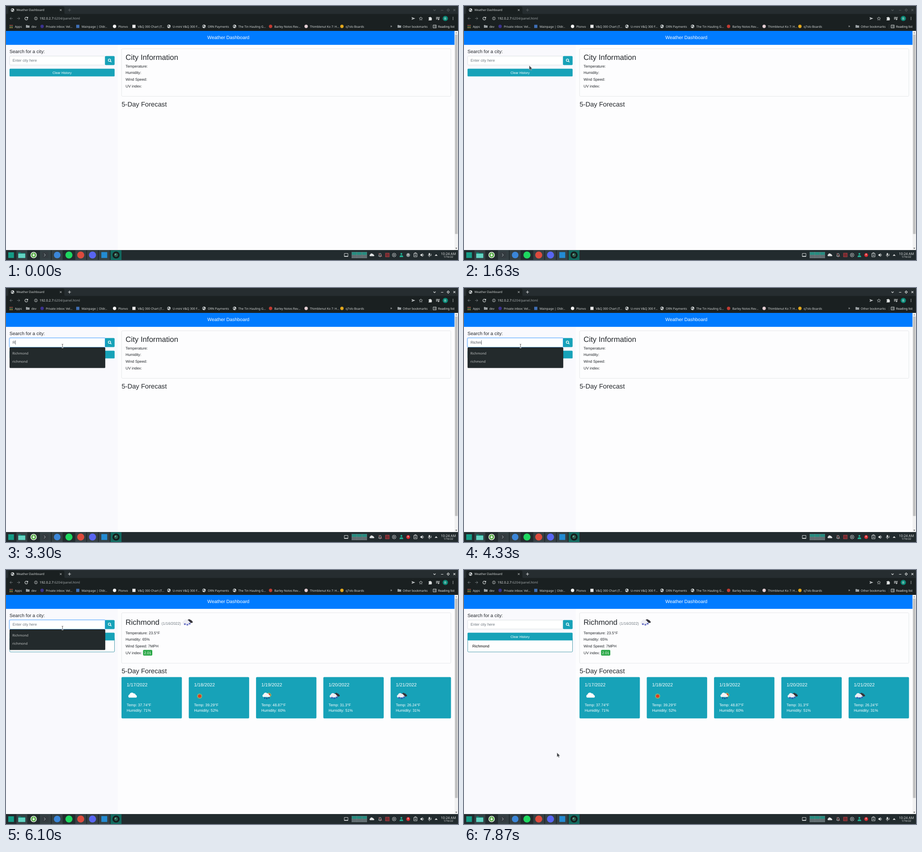
Write an HTML page that moves like this. It is 998 px wide and 561 px high and loops after 8000 ms.

```html
<!DOCTYPE html>
<html lang="en">
<head>
<meta charset="utf-8">
<title>Weather Dashboard</title>
<style>
html, body { margin: 0; width: 100%; height: 100%; overflow: hidden; background: #fdfdfe; }
svg { display: block; width: 100vw; height: 100vh; }
text { font: 8.317px "Liberation Sans", Arial, sans-serif; fill: #212529; text-rendering: geometricPrecision; white-space: pre; }
.ui text { font-family: "Noto Sans", "Open Sans", sans-serif; font-size: 6.65px; fill: #d9dcdc; }
</style>
</head>
<body>
<svg id="stage" viewBox="0 0 998 561" preserveAspectRatio="none"></svg>
<script>
const LOOP = 8000;
const TEAL = '#17a2b8', LIGHT = '#dfe2e2';

// Markup helpers
const rect = (x, y, w, h, fill, more = '') => `<rect x="${x}" y="${y}" width="${w}" height="${h}" fill="${fill}" ${more}/>`;
const dot = (x, y, r, fill, more = '') => `<circle cx="${x}" cy="${y}" r="${r}" fill="${fill}" ${more}/>`;
const fill = (d, color, more = '') => `<path d="${d}" fill="${color}" ${more}/>`;
const line = (d, color = LIGHT, w = 1, more = '') => `<path d="${d}" fill="none" stroke="${color}" stroke-width="${w}" ${more}/>`;
const text = (x, y, s, style = '', more = '') =>
  `<text x="${x}" y="${y}" style="${style}" ${more}>${s.replace(/&/g, '&amp;')}</text>`;
const at = (x, y, body) => `<g transform="translate(${x} ${y})">${body}</g>`;
const group = (id, body) => `<g id="${id}">${body}</g>`;

const globe = (x, y) => at(x, y, dot(0, 0, 3.7, LIGHT) +
  fill('M-3-1L-1-2.6L1-1.6L0 0L-1.6.4L-1 2L-2.6 1ZM1 .4L3 0L2 2.4L.6 2Z', '#30383b'));
const folder = (x, y) => fill(`M${x - 4} ${y - 3}h3l1 1h4v5h-8z`, '#9aa0a3');

// Weather icons
const cloud = (x, y, s, color) => at(x, y,
  fill('M-7 4A3.4 3.4 0 0 1-6-2A4.6 4.6 0 0 1 2-4A3.8 3.8 0 0 1 6-1A2.7 2.7 0 0 1 7 4Z', color, `transform="scale(${s})"`));
const flake = (x, y) => line(`M${x - 2.4} ${y}h4.8M${x - 1.2} ${y - 2}l2.4 4M${x + 1.2} ${y - 2}l-2.4 4`, '#3540b0', 0.9);
const sun = (x, y, r) => dot(x, y, r + 1.1, 'none', 'stroke="#f5b62c" stroke-width="1.8" stroke-dasharray="1.4 1"') + dot(x, y, r, '#e6391f');
const drop = (x, y) => fill(`M${x} ${y - 2}q2 2.6 0 4q-2.6-.6 0-4`, '#1b2a86');
const icons = {
  cloud: cloud(0, -1, 1.15, '#d6dde2') + cloud(0, -1.6, 1.08, '#fff'),
  sun: sun(0, 0, 3.6),
  rain: sun(4, -2.5, 3) + cloud(-2, -2, 1, '#f4f4f6') + drop(-5, 4) + drop(-.5, 5) + drop(4, 3.6),
  snow: cloud(5, -2.5, .82, '#35343b') + cloud(-2, -1, 1.02, '#eeeef4') + flake(-5.5, 3.6) + flake(0, 4.8) + flake(5, 2.6)
};

function browser() {
  const bookmarks = [
    [88, 'Private inbox: Vel...', '#3b3290'], [167, 'Mainpage | Oldr...', '#3f6fb5', 1], [248, 'Plonvo', '#f4f4f4'],
    [291, 'V&Q 300 Chart (T...', '#e8e8e8', 1], [368, 'U-mini V&Q 300 F...'], [445.5, 'ORN Payments'],
    [513, 'The Tin Hauling G...'], [592.5, 'Barley Notes Rev...', '#c23b32'],
    [671, 'Thimblenut Ko 7: H...', '#e3cdd2'], [750, 'q7vlo Boards', '#e2a71c']
  ];
  let s = rect(0, 0, 998, 18, '#262d30') + rect(0, 17.5, 998, 37.5, '#1a2021') +
    fill('M2 18q3 0 3-3V5q0-4 4-4h116q4 0 4 4v10q0 3 3 3z', '#1a2021') +
    globe(14.5, 9) + text(23, 11.4, 'Weather Dashboard', 'font-size:6.55px') +
    line('M118.8 7l4 4m0-4l-4 4', '#c9cccc', .9) +
    group('controls', line('M137 9h6.4m-3.2-3.2v6.4M943.8 8l2.4 2.4l2.4-2.4M960.5 9.5h5M973.8 9l2.6-2.6l2.6 2.6l-2.6 2.6zM987.8 6.8l4.4 4.4m0-4.4l-4.4 4.4', LIGHT, 1.1));
  // Toolbar
  s += line('M14.6 27.5h-6m3-3l-3 3l3 3M24.6 27.5h6m-3-3l3 3l-3 3', '#70777a', 1) +
    line('M47.4 25.6a3.2 3.2 0 1 0 .6 3', LIGHT, 1.1) + fill('M48.6 23.6v3.6h-3.6z', LIGHT) +
    dot(66, 27.5, 3.2, 'none', `stroke="${LIGHT}" stroke-width=".8"`) + line('M66 27v2.2M66 25.4v.9', LIGHT, .9) +
    text(74, 30.2, '192.0.2.7<tspan fill="#9ba1a3">:6204/panel.html</tspan>', 'font-size:7.3px') +
    fill('M895.5 24.5l8 3l-8 3l.8-2.5l3.5-.5l-3.5-.5z', '#c5c9ca') +
    line('M916 24l1.1 2.4l2.6.3l-1.9 1.8l.5 2.6l-2.3-1.3l-2.3 1.3l.5-2.6l-1.9-1.8l2.6-.3z', '#c5c9ca', .8) +
    fill('M933 25.3h2.2a1.3 1.3 0 0 1 2.6 0h2v2.2a1.3 1.3 0 0 1 0 2.4v1.8h-6.8v-2a1.2 1.2 0 0 0 0-2.4z', LIGHT) +
    line('M949.5 25h5.6m-5.6 2h5.6m-5.6 2h3.2M956 30v-5h1.8', LIGHT, 1) + dot(955, 29.8, 1.3, LIGHT) +
    dot(970, 27.5, 5.8, '#0b8a78') + text(970, 29.8, 'B', 'text-anchor:middle;fill:#fff') +
    [-2.5, 0, 2.5].map(d => dot(987, 27.5 + d, .8, LIGHT)).join('');
  // Bookmarks
  for (let i = 0; i < 9; i++)
    s += rect(7.8 + i % 3 * 2.6, 41.8 + (i / 3 | 0) * 2.6, 1.7, 1.7, ['#d7584c', '#5d9c62', '#d3b04a'][i / 3 | 0]);
  s += text(19.5, 47.6, 'Apps') + folder(48, 45) + text(56, 47.6, 'dev');
  for (const [x, label, color, square] of bookmarks) {
    s += !color ? globe(x - 8.3, 45) : square ? rect(x - 12, 41.5, 7, 7, color) : dot(x - 8.3, 45, 3.7, color);
    s += text(x, 47.6, label);
  }
  return s + text(848.5, 47.4, '»', 'font-size:8px') + folder(868.5, 45) + text(876, 47.6, 'Other bookmarks') +
    rect(938.5, 40, .6, 10, '#454c4f') + line('M943 42h7v6.4h-7zM944.5 44h1m1 0h2.5m-4.5 2.2h1m1 0h2.5', LIGHT, .9) +
    text(954, 47.6, 'Reading list', 'fill:#f2f3f3');
}

function taskbar() {
  let s = rect(0, 539, 998, 22, '#222b2e');
  for (const x of [23, 75, 101, 153, 179, 205]) s += rect(x, 539.5, 24, 21.5, '#354044');
  s += rect(231, 539.5, 24, 21.5, '#12695f') +
    rect(5, 544, 12.5, 12.5, '#149c86') +
    fill('M27 544h5l1 1.5h9.5v11h-15.5z', '#12806f') + rect(27, 547, 15.5, 9.5, '#63d2c1') +
    dot(61, 550, 7, '#dfe8dc') + dot(61, 550, 5.4, '#55ab45') + line('M61 546.5v5m-2.5-2l2.5 2.5l2.5-2.5', '#fff', 1.6) +
    rect(80, 543.5, 13.5, 13, '#343b40') + line('M84 547l3 3l-3 3', '#b3bcbf') +
    dot(113, 550, 7.3, '#3b86d8') + dot(139, 550, 7.8, '#1ed760') + dot(165, 550, 7.8, '#dc4b3e') +
    dot(191, 550, 7.8, '#5865f2') + rect(210.5, 543.5, 13, 13, '#238bd3') +
    dot(243, 550, 7.8, '#171b1c') + dot(243, 550, 4.4, '#2b5f50') + dot(241.5, 548.5, 1.5, '#78b49d');
  // Tray
  s += line('M747 546.5h8v7h-8zM747 552.5h8', LIGHT, .9);
  for (let i = 0; i < 6; i++)
    s += rect(763.5 + i % 3 * 11.3, i < 3 ? 543.5 : 550.4, 10.8, 6.4, i < 3 ? '#258d80' : '#626d71', 'stroke="#869397" stroke-width=".4"');
  s += cloud(808, 550, .62, LIGHT) +
    line('M822.5 552.5h7l-1.2-1.6v-2.2a2.3 2.3 0 0 0-4.6 0v2.2zM825 554h2', '#c8cccc', .9) + line('M822.5 546l7.5 8', '#c8474b', .9) +
    rect(838, 546, 8, 8, '#5a2428', 'stroke="#d0454b" stroke-width=".9"') + line('M839 553l6-6m-6 3l3-3m0 6l3-3', '#d0454b', .7) +
    dot(857, 550, 4, 'none', `stroke="${LIGHT}" stroke-width=".9"`) + fill('M855.8 548v4l3.2-2z', LIGHT) +
    dot(873, 547.5, 2, '#20b295') + fill('M869 554.5q0-4 4-4t4 4z', '#20b295') +
    dot(888, 550, 4.3, '#8b9294', 'id="record"') + rect(887, 547, 1.6, 3.6, '#e0dcdc') +
    line('M900.5 546.5h7v7.5h-7zM902.5 546v-1h3v1M902.5 549.5h3m-3 2h3', LIGHT, .9) +
    fill('M915 548.6h2l2.6-2.6v8l-2.6-2.6h-2z', LIGHT) + line('M921 547.5q2 2.5 0 5', LIGHT, .9) +
    rect(933.3, 545.5, 3, 5.4, LIGHT, 'rx="1.5"') + line('M932 549.5q0 3 2.8 3t2.8-3M934.8 552.5v2.2M938.5 547q1.4 2.5 0 5', LIGHT, .8) +
    fill('M946.5 551.7l3.3-3.4l3.3 3.4z', LIGHT) +
    text(976.8, 550.4, '10:24 AM', 'font-size:7.6px;text-anchor:middle') +
    text(976.8, 556.4, '1/16/22', 'font-size:5.9px;text-anchor:middle');
  return s;
}

const lines = (y, items) => items.map((s, i) => text(264, y + i * 14.57, s)).join('');
const panel = h => rect(255.3, 94.5, 726.9, h, '#fdfdfe', 'rx="2" stroke="#dcdee1" stroke-width=".7"');

function forecast() {
  const days = [['cloud', '37.74', 71], ['sun', '39.29', 52], ['rain', '48.87', 60], ['snow', '31.3', 51], ['snow', '26.24', 31]];
  return days.map(([icon, temp, humidity], i) => at(255 + 148.55 * i, 236.5,
    rect(0, 0, 133.3, 91.2, TEAL, 'rx="2"') +
    text(11.6, 20.8, `1/${17 + i}/2022`, 'font-size:10.35px;fill:#fff') + at(24, 42, at(icon === 'sun' ? 0 : .5, 0, icons[icon])) +
    text(11.6, 64.2, `Temp: ${temp}°F`, 'fill:#fff') + text(11.6, 76.8, `Humidity: ${humidity}%`, 'fill:#fff'))).join('');
}

function page() {
  return rect(0, 55, 998, 484, '#fdfdfe') + rect(0, 86, 247, 453, '#f9f9fd') + rect(0, 55, 990.5, 30.8, '#007bff') +
    text(491, 73.3, 'Weather Dashboard', 'font-size:10.4px;fill:#fff;text-anchor:middle') +
    rect(990.5, 55, 7.5, 484, '#f1f1f1') + rect(991.3, 63, 5.8, 440.5, '#c1c1c1') +
    fill('M992.2 60.2h4l-2-2.4z', '#8a8a8a') + fill('M992.2 534h4l-2 2.4z', '#505050') +
    text(7.8, 103.9, 'Search for a city:', 'font-size:10.4px') +
    rect(8, 110.6, 211, 19.8, '#fff', 'id="field" rx="2" stroke-width=".7"') +
    rect(218.5, 110.4, 21.3, 20.2, TEAL, 'rx="2"') +
    dot(228.4, 119.7, 2.6, 'none', 'stroke="#fff" stroke-width="1.3"') + line('M230.3 121.6l2.3 2.4', '#fff', 1.5) +
    rect(7.2, 109.8, 212.4, 21.4, 'none', 'id="glow" rx="2.6" stroke="#007bff" stroke-opacity=".3" stroke-width="1.7"') +
    text(14.5, 123.2, '', '', 'id="typed"') + rect(0, 115.4, .7, 9.6, '#30363b', 'id="caret"') +
    group('history', rect(8.2, 150, 231.4, 31, '#fefefe', 'rx="2" stroke="#23879a" stroke-width=".8"') + text(18.5, 171, 'Richmond', 'fill:#000')) +
    rect(7.8, 138.6, 232, 17, TEAL, 'rx="1.6"') +
    text(123.8, 149.7, 'Clear History', 'font-size:7.28px;fill:#fff;text-anchor:middle') +
    group('empty', panel(105) + text(264, 118.7, 'City Information', 'font-size:16.6px') +
      lines(135.8, ['Temperature:', 'Humidity:', 'Wind Speed:', 'UV index:']) +
      text(255.2, 222, '5-Day Forecast', 'font-size:14.6px')) +
    group('result', panel(111.5) + text(264, 120.9, 'Richmond', 'font-size:16.6px') +
      text(343.6, 120.9, '(1/16/2022)', 'fill:#6c757d') + at(400.5, 116, icons.snow) +
      lines(141.9, ['Temperature: 23.5°F', 'Humidity: 65%', 'Wind Speed: 7MPH', 'UV index:']) +
      rect(302.6, 176.4, 20.4, 12.6, '#28a745', 'rx="2"') + text(304.7, 185.6, '2.01', 'fill:#fff') +
      text(255.2, 228.2, '5-Day Forecast', 'font-size:14.6px') + forecast());
}

const option = (i, s) => text(14, 146.5 + i * 18.75, s, 'font-size:7.45px;font-weight:500;fill:#bcbfbf');
const menu = (id, items) => group(id,
  rect(7.6, 131.4, 211.9, 8.2 + items.length * 18.75, '#000', 'rx="2" opacity=".3"') +
  rect(8, 131, 211, 8 + items.length * 18.75, '#232a2c', 'rx="1.6"') + items.map((s, i) => option(i, s)).join(''));

const stage = document.getElementById('stage');
stage.innerHTML = page() + `<g class="ui">${browser()}${taskbar()}${group('dropdown',
  menu('all', ['Miami', 'Richmond', 'richmond', 'London']) + menu('match', ['Richmond', 'richmond']))}</g>` +
  group('arrow', fill('M0 0v9.6l2.2-2l1.5 3.2l1.6-.8l-1.5-3h3z', '#3a3d40', 'stroke="#e8e8ea" stroke-width=".5"')) +
  group('beam', line('M-1.7-4q1.7 0 1.7 1q0-1 1.7-1M0-3v6M-1.7 4q1.7 0 1.7-1q0 1 1.7 1', '#fff', 1.8) +
    line('M-1.7-4q1.7 0 1.7 1q0-1 1.7-1M0-3v6M-1.7 4q1.7 0 1.7-1q0 1 1.7 1', '#333', .8));

const ui = {};
for (const el of stage.querySelectorAll('[id]')) ui[el.id] = el;
const show = (el, on) => { el.style.display = on ? '' : 'none'; };
const ramp = (t, a, b) => Math.min(1, Math.max(0, (t - a) / (b - a)));
const ease = p => p * p * (3 - 2 * p);

// Pointer path: time, x, y
const path = [[300, 1010, 330], [800, 292.5, 155], [870, 292.5, 155], [1330, 170, 137], [1500, 170, 137], [1730, 127, 128],
  [2200, 127, 128], [2500, 124.7, 128], [6100, 124.7, 128], [6700, 135.5, 381], [6900, 135.5, 381], [7670, 205.3, 403.5]];
const keyTimes = [3230, 3620, 3960, 4170, 4270, 4400, 4530, 4640];
const FOCUS = 2130, ENTER = 5230, LOADED = 5600, BLUR = 6670;

function pointer(t) {
  const i = path.findIndex(p => p[0] > t);
  if (i === 0) return path[0].slice(1);
  if (i < 0) return path[path.length - 1].slice(1);
  const [t0, x0, y0] = path[i - 1], [t1, x1, y1] = path[i], p = ease(ramp(t, t0, t1));
  return [x0 + (x1 - x0) * p, y0 + (y1 - y0) * p];
}

function draw(t) {
  const count = t < ENTER ? keyTimes.filter(k => k <= t).length : 0;
  const focus = ease(ramp(t, FOCUS, FOCUS + 150)) - ease(ramp(t, BLUR, BLUR + 150));
  const fade = ramp(t, 6770, 6900);

  ui.controls.style.opacity = t < 1970 ? .25 : 1;
  ui.record.setAttribute('fill', t < 60 ? '#8b9294' : '#d92a2f');

  ui.typed.textContent = count ? 'Richmond'.slice(0, count) : 'Enter city here';
  ui.typed.style.fill = count ? '#495057' : '#6c757d';
  const mix = (a, b) => Math.round(a + (b - a) * focus);
  ui.field.setAttribute('stroke', `rgb(${mix(206, 128)},${mix(212, 189)},${mix(218, 255)})`);
  ui.glow.style.opacity = focus;
  show(ui.caret, (t >= FOCUS && t < 2800) || (t >= keyTimes[0] && t < 5170));
  ui.caret.setAttribute('x', count ? 14.6 + ui.typed.getComputedTextLength() : 14.4);

  show(ui.dropdown, t >= FOCUS && fade < 1);
  show(ui.all, t < keyTimes[0]);
  show(ui.match, t >= keyTimes[0]);
  const scale = 1 - .04 * fade;
  ui.dropdown.style.opacity = 1 - fade;
  ui.dropdown.setAttribute('transform', `translate(113.5 154) scale(${scale}) translate(-113.5 -154)`);

  show(ui.history, t >= ENTER);
  show(ui.empty, t < LOADED);
  show(ui.result, t >= LOADED);

  const [x, y] = pointer(t);
  const overField = x > 8 && x < 219 && y > 110 && y < 131;
  show(ui.beam, overField);
  show(ui.arrow, !overField);
  for (const el of [ui.beam, ui.arrow]) el.setAttribute('transform', `translate(${x} ${y})`);
}

const start = performance.now();
function tick() {
  draw((performance.now() - start) % LOOP);
  requestAnimationFrame(tick);
}
tick();
</script>
</body>
</html>
```
